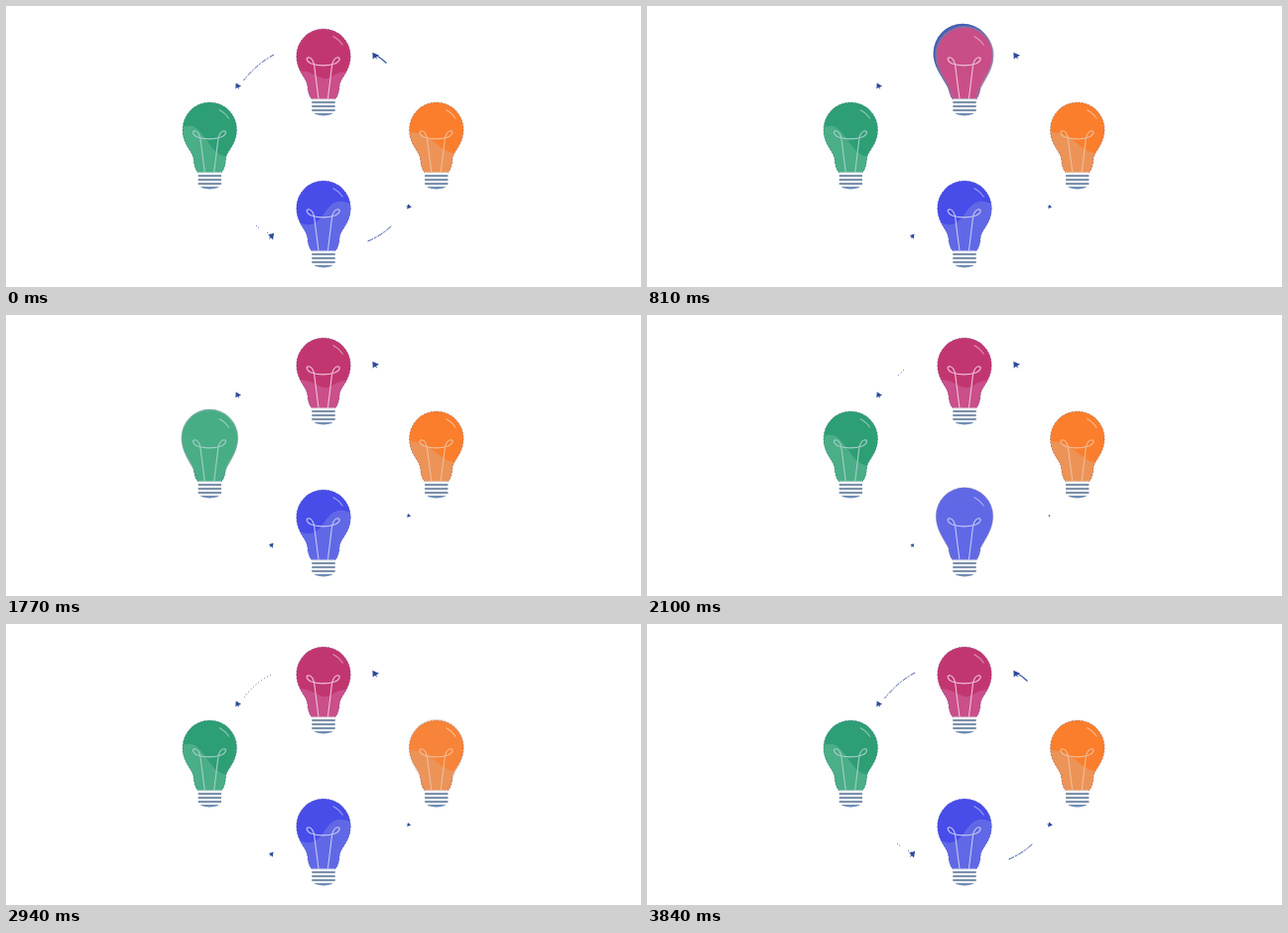
Recreate the animation shown at these times as an HTML page with a canvas. Size 640x283 px, loop 3.87 s.

```html
<!DOCTYPE html>
<html lang="en">
<head>
<meta charset="utf-8">
<title>Light bulbs</title>
<style>
  html, body { margin: 0; width: 100%; height: 100%; overflow: hidden; background: #fff; }
  canvas { display: block; }
</style>
</head>
<body>
<canvas id="stage" width="640" height="283"></canvas>
<script>
const ctx = document.getElementById('stage').getContext('2d');
const STEP = 30, STEPS = 129, TURN = 32, FADE = 6;
const INK = '#2d4a98';

// Bulbs in lighting order; wave is the edge between dark and light glass.
const bulbs = [
  { x: 320, y: 23, dark: '#c23670', light: '#ca4f8a', wire: '#efc3d8', glow: 1.5, halo: true,
    wave: [[-30, 43], [-21, 42], [-13, 44], [-4, 49], [4, 51], [13, 45], [21, 43], [30, 44]] },
  { x: 205.3, y: 97, dark: '#2e9e75', light: '#4aae87', wire: '#a4cfca', glow: 1.2,
    wave: [[-30, 25], [-21, 23], [-14, 25], [-5, 35], [3, 47], [10, 53], [19, 55], [30, 55]] },
  { x: 320, y: 176, dark: '#484ce8', light: '#6168e6', wire: '#c3c9f2', glow: 1.4,
    wave: [[-30, 41], [-22, 43], [-13, 45], [-4, 40], [3, 29], [10, 22], [18, 20], [30, 24]] },
  { x: 433.8, y: 97, dark: '#fa7e2c', light: '#ec9358', wire: '#f2bd97', glow: 1.2,
    wave: [[-30, 30], [-21, 30], [-12, 33], [-4, 38], [4, 45], [12, 50], [20, 52], [30, 53]] }
];

const glass = new Path2D(
  'M-11.5 71 C-14.5 68 -15.8 63 -16.2 57 C-16.6 50 -27.3 43 -27.3 27.3 ' +
  'A27.3 27.3 0 0 1 27.3 27.3 C27.3 43 16.6 50 16.2 57 C15.8 63 14.5 68 11.5 71 Z');
const filament = new Path2D(
  'M-5 70.5 L-9.2 38 C-9.6 33 -12 28.8 -15 28.8 C-18.3 29 -17 33 -12.4 35 ' +
  'C-5 37.3 4.4 37.3 11.6 35 C16.4 33 17.7 29 14.4 28.8 C11.4 28.8 8.8 33 8.4 38 L4.4 70.5');
const shine = new Path2D('M9.5 7.5 Q15.5 10.5 19.5 16.5');
const cap = new Path2D('M-11.7 70.5 H11.7 V83 Q9 87 0 87.5 Q-9 87 -11.7 83 Z');

function pear(r) {
  const p = new Path2D();
  p.moveTo(-11.5, 71);
  p.bezierCurveTo(-14, 56, -r, 45, -r, 26.5);
  p.arc(0, 26.5, r, Math.PI, 0);
  p.bezierCurveTo(r, 45, 14, 56, 11.5, 71);
  p.closePath();
  return p;
}

function lowerGlass(points) {
  const p = new Path2D();
  p.moveTo(...points[0]);
  for (let i = 1; i < points.length - 1; i++) {
    const [x, y] = points[i], [nx, ny] = points[i + 1];
    p.quadraticCurveTo(x, y, (x + nx) / 2, (y + ny) / 2);
  }
  p.lineTo(...points[points.length - 1]);
  p.lineTo(30, 75);
  p.lineTo(-30, 75);
  p.closePath();
  return p;
}

function fill(path, color) {
  ctx.fillStyle = color;
  ctx.fill(path);
}

function stroke(path, color, width, dash = []) {
  ctx.setLineDash(dash);
  ctx.strokeStyle = color;
  ctx.lineWidth = width;
  ctx.stroke(path);
  ctx.setLineDash([]);
}

function drawGlass(b) {
  ctx.save();
  ctx.clip(glass);
  ctx.fillStyle = b.dark;
  ctx.fillRect(-30, -2, 60, 75);
  fill(lowerGlass(b.wave), b.light);
  ctx.restore();
  stroke(glass, 'rgba(45,65,135,0.5)', 0.8, [1.5, 2]);
}

function drawHalo(r) {
  ctx.save();
  ctx.translate(-1.8, -2);
  fill(pear(r + 1), '#3a53ab');
  ctx.restore();
}

function drawCap() {
  ctx.save();
  ctx.clip(cap);
  ctx.fillStyle = '#f0f4f7';
  ctx.fillRect(-12, 70, 24, 18);
  ctx.fillStyle = '#7c90ab';
  for (const y of [73, 77, 81]) ctx.fillRect(-12, y, 24, 2);
  ctx.fillStyle = '#6f8db5';
  ctx.fillRect(-12, 85, 24, 3);
  ctx.restore();
}

function drawBulb(b, lit) {
  const r = 27.3 + b.glow * lit;
  ctx.save();
  ctx.translate(b.x, b.y);
  ctx.globalAlpha = lit;
  if (b.halo) drawHalo(r);
  ctx.globalAlpha = 1;
  drawGlass(b);
  ctx.globalAlpha = lit;
  const shape = pear(r);
  fill(shape, b.light);
  stroke(shape, 'rgba(125,125,165,0.75)', b.halo ? 1.8 : 0.6);
  ctx.globalAlpha = 1;
  drawCap();
  stroke(filament, b.wire, 1.1);
  stroke(shine, 'rgba(255,255,255,0.45)', 1.1);
  ctx.restore();
}

function litAmount(index, step) {
  const s = step - index * TURN;
  const p = Math.max(0, Math.min(1, s / FADE, (TURN - s) / FADE));
  return p * p * (3 - 2 * p);
}

function arrowHead(x, y, size, angle) {
  ctx.save();
  ctx.translate(x, y);
  ctx.rotate(angle);
  ctx.scale(size, size);
  fill(new Path2D('M-0.5 -0.5 L0.5 -0.15 L0.1 0.1 L0.3 0.45 L-0.1 0.2 L-0.35 0.5 Z'), INK);
  ctx.restore();
}

function drawArrows(step) {
  const full = step < 3 || step > 124;
  const fading = step >= 64 && step < 96;
  arrowHead(372.5, 50.5, 7, 0.1);
  arrowHead(234, 81, 6, 0.2);
  arrowHead(267.5, 232.5, fading ? 4 : full ? 6.5 : 5, 1.4);
  arrowHead(405.3, 202.3, fading ? 2 : full ? 5 : 4, 2.4);

  const arc = (d, dash, width = 0.9) => stroke(new Path2D(d), INK, width, dash);
  if (full) {
    arc('M270 49 Q252.5 58.5 239.5 75', [5, 1.5, 2, 1]);
    arc('M371 48.5 Q377 51.5 383.5 57.5', [], 1.1);
    arc('M364.5 237 Q378 231.5 389 221', [6, 1, 3, 1]);
    arc('M252 221 L255 223.5 M263 228 L269 231', [1, 2]);
  } else if (step >= 96) {
    arc('M267 51 Q251 59 240 74', [1, 2.5]);
  } else if (fading) {
    arc('M259 55 L252 62', [1, 2.5]);
  }
}

function draw() {
  const step = Math.floor(performance.now() / STEP) % STEPS;
  ctx.fillStyle = '#fff';
  ctx.fillRect(0, 0, 640, 283);
  ctx.lineJoin = 'round';
  drawArrows(step);
  bulbs.forEach((b, i) => drawBulb(b, litAmount(i, step)));
  requestAnimationFrame(draw);
}
draw();
</script>
</body>
</html>
```
